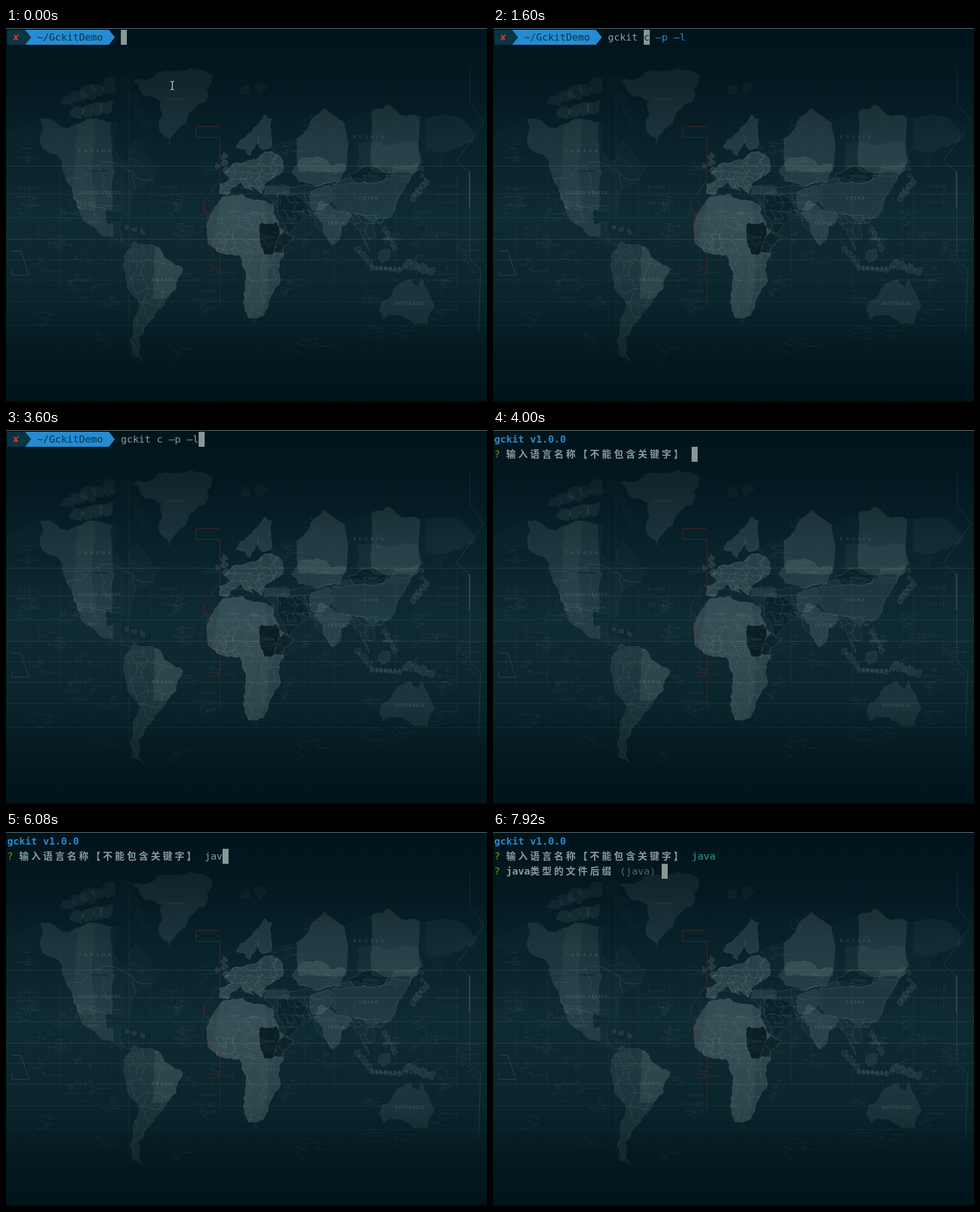
An HTML page with a canvas for the animation above (8000 ms loop, 804x624 px).

```html
<!DOCTYPE html>
<html lang="zh">
<head>
<meta charset="utf-8">
<title>Terminal</title>
<style>
html, body { margin: 0; width: 100%; height: 100%; overflow: hidden; background: #00141b; }
canvas { display: block; width: 804px; height: 624px; }
</style>
</head>
<body>
<canvas id="stage" width="804" height="624"></canvas>
<script>
const W = 804, H = 624, LOOP = 8000;
const ctx = document.getElementById('stage').getContext('2d');
const MONO = '"DejaVu Sans Mono", monospace';
const CJK = '"Noto Sans CJK SC", "Noto Sans CJK", sans-serif';
const C = {
  text: '#8b9b9b', blue: '#268bd2', green: '#859900', cyan: '#2aa198',
  dim: '#506970', red: '#dc322f', dark: '#073642', cursor: '#879898'
};

// ---------- wallpaper ----------
const map = document.createElement('canvas');
map.width = W; map.height = H;
const g = map.getContext('2d');
let seed = 11;
const rnd = () => (seed = (seed * 16807) % 2147483647) / 2147483647;
const pale = a => `rgba(138,160,163,${a})`;
const deep = a => `rgba(4,24,30,${a})`;
const points = s => s.split(' ').map(p => p.split(',').map(Number));

// Midpoint displacement turns a few key points into a ragged coast.
function rough(pts, closed, amount = 0.17, levels = 3) {
  for (let k = 0; k < levels; k++) {
    const out = [];
    pts.forEach((p, i) => {
      out.push(p);
      if (!closed && i === pts.length - 1) return;
      const q = pts[(i + 1) % pts.length];
      const d = (rnd() - 0.5) * 2 * amount;
      out.push([(p[0] + q[0]) / 2 + (q[1] - p[1]) * d, (p[1] + q[1]) / 2 - (q[0] - p[0]) * d]);
    });
    pts = out;
  }
  return pts;
}

function trace(pts, closed) {
  const path = new Path2D();
  pts.forEach(p => path.lineTo(p[0], p[1]));
  if (closed) path.closePath();
  return path;
}

function line(s, style, width = 1) {
  g.strokeStyle = style;
  g.lineWidth = width;
  g.stroke(trace(points(s)));
}

function land(pts, fill, edge, inside) {
  const path = trace(rough(pts, true), true);
  g.fillStyle = fill;
  g.fill(path);
  if (inside) {
    g.save();
    g.clip(path);
    inside();
    g.restore();
  }
  g.strokeStyle = pale(edge);
  g.lineWidth = 0.7;
  g.stroke(path);
}

// Time zone stripe with a slightly wandering edge
function zone(x, y, w, h, alpha) {
  g.fillStyle = pale(alpha);
  g.fill(trace(rough([[x, y], [x + w, y], [x + w, y + h], [x, y + h]], true, 0.07), true));
}

// Jittered grid of country borders
function borders(x, y, w, h, step, alpha) {
  const node = (i, j) => {
    const wave = n => Math.sin(n * 12.9898 + i * 78.233 + j * 37.719) * 0.3;
    return [x + (i + (j % 2) / 2 + wave(1)) * step, y + (j + wave(2)) * step];
  };
  g.strokeStyle = pale(alpha);
  g.lineWidth = 0.7;
  for (let j = 0; j * step <= h; j++)
    for (let i = 0; i * step <= w; i++)
      for (const next of [node(i + 1, j), node(i, j + 1)])
        if (rnd() < 0.85) g.stroke(trace(rough([node(i, j), next])));
}

// Chain of small islands from one place to another
function islands(x0, y0, x1, y1, n, size, alpha, edge = alpha * 1.5) {
  for (let i = 0; i < n; i++) {
    const k = n > 1 ? i / (n - 1) : 0;
    const ring = Array.from({ length: 7 }, (_, a) => {
      const r = size * (0.5 + rnd() * 0.7);
      return [x0 + (x1 - x0) * k + Math.cos(a * 0.9) * r, y0 + (y1 - y0) * k + Math.sin(a * 0.9) * r];
    });
    land(ring, pale(alpha), edge);
  }
}

function label(s, x, y, size, gap, alpha) {
  g.font = `${size}px "Noto Serif", "Liberation Serif", serif`;
  g.letterSpacing = gap + 'px';
  g.fillStyle = pale(alpha);
  g.fillText(s, x, y);
}

function grid() {
  g.setLineDash([1, 2]);
  for (let x = 22.5; x < W; x += 17) line(`${x},250 ${x},430`, pale(0.12));
  for (let x = 39.5; x < W; x += 51) line(`${x},120 ${x},500`, pale(0.1));
  g.setLineDash([1, 1]);
  line('205.5,100 205.5,540', pale(0.2));
  g.setLineDash([]);
  for (let lat = -45; lat <= 60; lat += 15) {
    const y = Math.round(386 - 163 * Math.asinh(Math.tan(lat * Math.PI / 225))) + 0.5;
    line(`0,${y} 804,${y}`, pale(lat === 60 || lat === 15 ? 0.2 : 0.12));
  }
}

function americas() {
  land(points('58,152 150,152 186,160 180,206 204,222 216,188 258,230 240,256 214,270 203,312 170,302 168,330 192,324 197,358 212,362 150,334 112,284 96,240 58,192'),
    pale(0.03), 0.16, () => {
      zone(50, 130, 130, 110, 0.14);
      zone(112, 130, 38, 175, 0.06);
      zone(90, 238, 93, 130, 0.14);
      borders(96, 238, 120, 10, 60, 0.35);
      borders(116, 298, 60, 10, 24, 0.35);
    });
  land(points('0,180 30,164 58,152 58,192 24,202'), pale(0.02), 0.1);
  islands(104, 120, 172, 96, 5, 14, 0.12, 0.06);
  islands(118, 140, 170, 132, 4, 13, 0.15, 0.08);
  islands(200, 96, 232, 158, 4, 13, 0.03, 0.07);
  islands(202, 333, 228, 340, 3, 5, 0.13, 0.25);
  land(points('213,88 270,71 345,80 332,125 300,160 274,195 257,172 260,122 222,96'), pale(0.17), 0.07);
  land(points('213,356 255,366 268,385 295,402 284,436 258,468 234,496 222,540 230,557 210,545 220,452 200,408'),
    pale(0.15), 0.22, () => {
      zone(245, 350, 60, 102, 0.15);
      borders(204, 366, 50, 170, 24, 0.33);
    });
}

function africa() {
  land(points('360,284 396,278 446,296 464,338 482,348 456,392 459,420 430,480 405,484 400,430 402,410 390,378 352,372 337,348 344,308'),
    pale(0.25), 0.4, () => {
      zone(357, 270, 68, 220, 0.08);
      borders(340, 345, 46, 30, 12, 0.4);
      borders(357, 310, 90, 170, 22, 0.32);
      land(points('427,324 452,324 458,340 448,376 432,378 424,350'), deep(0.85), 0.4);
      land(points('454,352 464,336 484,348 462,376 448,374'), deep(0.75), 0.4);
    });
  islands(466, 442, 473, 424, 2, 7, 0.06);
}

function europe() {
  land(points('357,260 375,254 364,243 392,226 424,214 444,206 463,222 462,240 436,256 428,276 408,257 414,272 392,257 372,278 357,276'),
    pale(0.25), 0.4, () => borders(354, 204, 110, 76, 12, 0.4));
  land(points('386,200 402,180 432,145 444,152 442,200 428,203 422,180 408,213 398,202'), pale(0.22), 0.33);
  islands(365, 214, 367, 236, 3, 6, 0.2, 0.4);
  islands(353, 230, 353, 230, 1, 5, 0.15, 0.4);
  islands(402, 104, 424, 102, 2, 10, 0.08);
}

function asia() {
  land(points('444,200 462,190 500,172 532,133 566,158 600,142 640,128 700,150 775,166 790,180 740,205 728,236 700,206 690,235 668,255 560,250 462,240'),
    pale(0.025), 0.1, () => {
      zone(490, 120, 78, 120, 0.2);
      zone(612, 110, 86, 130, 0.18);
      zone(588, 190, 100, 45, 0.08);
      zone(702, 140, 80, 62, 0.06);
    });
  land(points('432,265 500,262 650,245 690,235 668,262 655,285 650,300 628,326 612,328 616,350 600,350 606,372 588,335 572,322 546,362 515,312 484,306 496,322 472,345 452,298 432,280'),
    pale(0.04), 0.3, () => {
      zone(432, 262, 42, 16, 0.14);
      land(points('454,280 484,278 508,312 490,340 470,348'), deep(0.5), 0.3);
      borders(450, 276, 70, 40, 15, 0.35);
      borders(575, 312, 45, 45, 13, 0.36);
    });
  land(points('545,262 572,250 632,256 650,232 690,225 668,262 655,285 642,316 612,325 575,310 545,290'), pale(0.11), 0.34);
  land(points('478,240 490,222 520,215 566,228 558,256 520,264 490,256'), pale(0.18), 0.35);
  land(points('510,272 540,262 546,280 528,304 512,304'), pale(0.16), 0.35);
  land(points('515,310 528,288 548,304 578,312 560,332 546,362 534,345'), pale(0.18), 0.3);
  land(points('572,244 604,230 642,240 628,256 592,260'), deep(0.4), 0.4);
  islands(680, 284, 702, 256, 5, 6, 0.12, 0.35);
  islands(696, 246, 693, 222, 3, 4, 0.1, 0.25);
  islands(588, 368, 608, 392, 4, 6, 0.1, 0.28);
  islands(630, 380, 630, 380, 1, 13, 0.12, 0.28);
  islands(612, 400, 658, 404, 7, 4, 0.14, 0.3);
  islands(634, 336, 650, 368, 5, 5, 0.1, 0.28);
  islands(672, 393, 710, 406, 4, 9, 0.14, 0.28);
  land(points('628,458 655,428 678,420 690,434 694,418 716,462 706,493 684,494 660,478 630,486'), pale(0.14), 0.13);
}

function lettering() {
  const big = (s, x, y, gap) => label(s, x, y, 7.5, gap, 0.42);
  big('CANADA', 121, 207, 4.6);
  big('UNITED STATES', 120, 277, 1.2);
  big('RUSSIA', 580, 184, 5);
  big('CHINA', 590, 286, 1.8);
  big('BRAZIL', 244, 422, 2);
  big('AUSTRALIA', 650, 462, 0.9);
  big('INDONESIA', 618, 403, 2.4);
  big('INDIA', 538, 328, 1.6);
  const small = (s, x, y) => label(s, x, y, 4.5, 0.2, 0.38);
  small('MEXICO', 137, 325);
  small('ALGERIA', 370, 308);
  small('LIBYA', 407, 311);
  small('SUDAN', 433, 351);
  small('SAUDI', 469, 321);
  small('ARABIA', 468, 327);
  small('KAZAKHSTAN', 509, 241);
  small('MONGOLIA', 597, 249);
  small('PHILIPPINES', 630, 354);
  small('GREENLAND', 268, 121);
  const sea = (s, x, y) => s.split(' ').forEach((w, i) => label(w, x - w.length * 2.9, y + i * 13.5, 5.5, 2.2, 0.24));
  sea('NORTH PACIFIC OCEAN', 38, 270);
  sea('NORTH ATLANTIC OCEAN', 273, 267);
  sea('NORTH PACIFIC OCEAN', 742, 266);
  sea('SOUTH ATLANTIC OCEAN', 339, 441);
  sea('SOUTH PACIFIC OCEAN', 120, 424);

  // Island and town notes gather in small clusters
  const words = ['Islands', 'Atoll', 'Cape', 'Bay of the North', 'Port', 'Reef', 'Gulf'];
  for (let c = 0; c < 75; c++) {
    const x = rnd() * 770, y = 345 + (rnd() + rnd() - 1) * 225;
    for (let i = 0; i < 6; i++)
      label(words[rnd() * words.length | 0], x + rnd() * 25, y + i * 4, 3.8, 0, 0.13 + rnd() * 0.17);
  }
}

function dateLines() {
  const red = 'rgba(150,38,44,0.62)';
  line('357,164.5 317.5,164.5 317.5,182.5 357,182.5', red);
  line('357.5,182 357.5,254 331.5,290 331.5,307 338,308 336,345 357.5,374 357.5,404', red);
  line('357.5,411 357.5,465', 'rgba(150,38,44,0.4)');
  g.strokeRect(339.5, 404.5, 17, 6);
  line('775.5,66 775.5,125 799,156 753,222 775.5,241 775.5,386 793,403 790,510', pale(0.24));
  line('774.5,240 774.5,300', pale(0.25), 2);
  line('10,372.5 25,372.5 38,412.5 10,412.5 10,403', pale(0.28));
}

function shade(colors, from, to) {
  const fill = g.createLinearGradient(0, from, 0, to);
  colors.forEach((c, i) => fill.addColorStop(i / (colors.length - 1), c));
  g.fillStyle = fill;
  g.fillRect(0, 0, W, H);
}

function wallpaper() {
  shade(['#01141b', '#08212a', '#0e2a32', '#0b262e', '#00141b'], 0, H);
  g.lineJoin = 'round';
  grid();
  americas();
  africa();
  europe();
  asia();
  dateLines();
  lettering();
  shade(['rgba(0,20,27,.5)', 'rgba(0,20,27,.1)', 'rgba(0,20,27,0)', 'rgba(0,20,27,.1)', 'rgba(0,20,27,.55)'], 50, 590);
  g.fillStyle = '#6f777a';
  g.fillRect(0, 0, W, 1);
  g.fillStyle = '#000c11';
  g.fillRect(0, 622, W, 2);
}

// ---------- terminal ----------
const CELL = 10, ROW = 25;
const COMMAND = 'gckit c –p –l';
const ANSWER = 'java';
const FIRST_KEY = 480, START = 3760, ENTER = 6480;

// Number of keys pressed by time t when typing evenly from a start time
const typed = (t, from, gap, max) => Math.max(0, Math.min(max, Math.floor((t - from) / gap) + 1));

// Cell by cell; wide characters take two cells.
function put(s, x, row, color, bold) {
  ctx.fillStyle = color;
  for (const ch of s) {
    const wide = ch > '\u2fff';
    ctx.font = `${bold ? 'bold ' : ''}${wide ? '16px ' + CJK : '16.61px ' + MONO}`;
    ctx.fillText(ch, x, 21 + row * ROW);
    x += wide ? CELL * 2 : CELL;
  }
  return x;
}

function caret(x, row) {
  ctx.fillStyle = C.cursor;
  ctx.fillRect(x, 3 + row * ROW, CELL, ROW);
}

function segment(x, end, color) {
  ctx.fillStyle = color;
  ctx.fill(trace([[x, 3], [end, 3], [end + CELL, 15.5], [end, 28], [x, 28]], true));
}

function shell(t) {
  segment(32, 172, C.blue);
  segment(2, 32, C.dark);
  put('✘', 12, 0, C.red, true);
  put('~/GckitDemo', 52, 0, C.dark);
  const n = typed(t, FIRST_KEY, 160, 6) + typed(t, 2000, 160, COMMAND.length - 6);
  const x = put(COMMAND.slice(0, n), 192, 0, C.text);
  caret(x, 0);
  if (n) {
    put(COMMAND.slice(n, n + 1), x, 0, '#0b2b34');
    put(COMMAND.slice(n + 1), x + CELL, 0, C.blue);
  }
}

function ask(s, row) {
  put('?', 2, row, C.green);
  return put(s, 22, row, C.text, true) + CELL;
}

function wizard(t) {
  put('gckit v1.0.0', 2, 0, C.blue, true);
  const done = t >= ENTER;
  let x = ask('输入语言名称【不能包含关键字】', 1);
  x = put(ANSWER.slice(0, typed(t, 5760, 160, ANSWER.length)), x, 1, done ? C.cyan : C.text);
  if (!done) return caret(x, 1);
  x = ask('java类型的文件后缀', 2);
  caret(put('(java)', x, 2, C.dim) + CELL, 2);
}

function pointer() {
  const beam = new Path2D('M275 88.5L278 90L281 88.5M278 90V102M275 103.5L278 102L281 103.5');
  ctx.strokeStyle = '#001016';
  ctx.lineWidth = 3;
  ctx.stroke(beam);
  ctx.strokeStyle = '#e8eeee';
  ctx.lineWidth = 1.3;
  ctx.stroke(beam);
}

function draw(now) {
  const t = now % LOOP;
  ctx.drawImage(map, 0, 0);
  if (t < START) shell(t);
  else wizard(t);
  if (t < FIRST_KEY) pointer();
  requestAnimationFrame(draw);
}

wallpaper();
requestAnimationFrame(draw);
</script>
</body>
</html>
```
